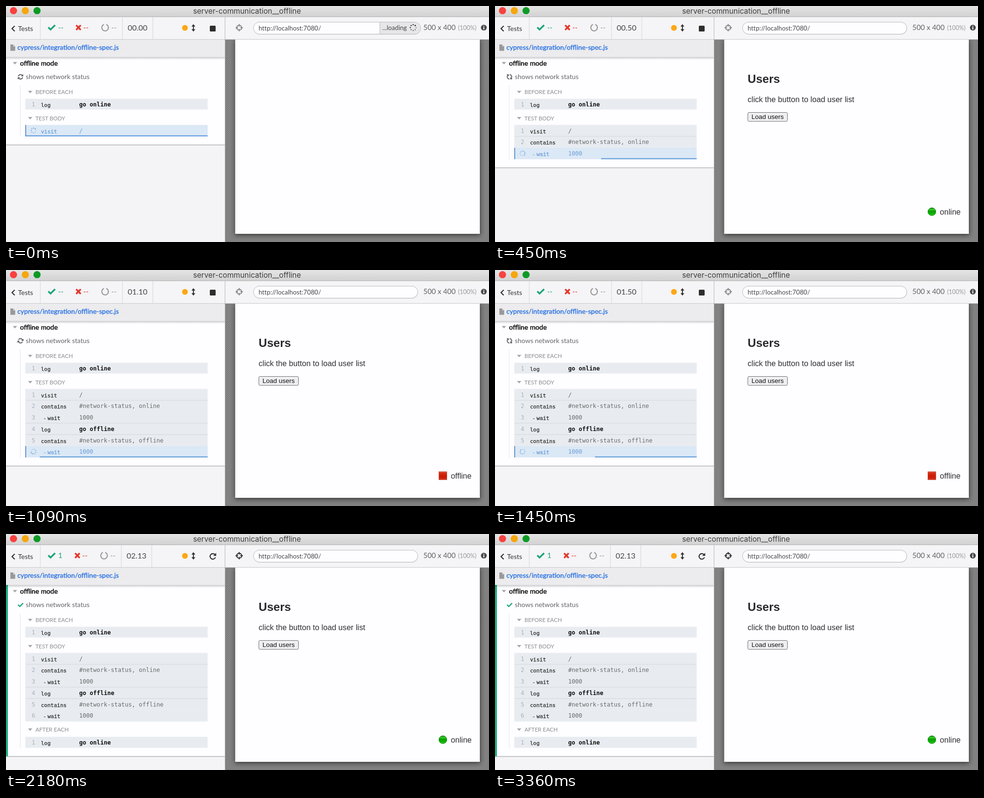
An HTML page that plays this animation: 1000x491 px, repeating every 3450 ms.

```html
<!DOCTYPE html>
<html lang="en">
<head>
<meta charset="utf-8">
<title>Test runner</title>
<style>
  html, body { margin: 0; width: 100%; height: 100%; overflow: hidden; background: #f4f3f5; }
  svg { display: block; width: 100%; height: 100%; }
  text { white-space: pre; }
  .ui { font-family: Lato, "Open Sans", sans-serif; }
  .title { font-family: Inter, "Liberation Sans", sans-serif; }
  .mono { font-family: "DejaVu Sans Mono", "Liberation Mono", monospace; }
  .page { font-family: "Liberation Sans", Arial, sans-serif; }
</style>
</head>
<body>
<svg viewBox="0 0 1000 491" xmlns="http://www.w3.org/2000/svg">
  <defs>
    <linearGradient id="bar" x2="0" y2="1"><stop stop-color="#e6e5e6"/><stop offset="1" stop-color="#d2d1d2"/></linearGradient>
    <linearGradient id="fade" x2="0" y2="1"><stop stop-color="#000" stop-opacity=".2"/><stop offset="1" stop-color="#000" stop-opacity="0"/></linearGradient>
    <linearGradient id="green" x2="0" y2="1"><stop stop-color="#0b7d05"/><stop offset=".22" stop-color="#3fce35"/><stop offset=".4" stop-color="#0aa004"/><stop offset=".7" stop-color="#08b002"/><stop offset="1" stop-color="#2fd022"/></linearGradient>
    <linearGradient id="red" x2="0" y2="1"><stop stop-color="#e2573f"/><stop offset=".25" stop-color="#d3240c"/><stop offset=".7" stop-color="#c91a05"/><stop offset="1" stop-color="#dc3a1e"/></linearGradient>
    <pattern id="stripes" width="4" height="4" patternUnits="userSpaceOnUse">
      <rect width="4" height="4" fill="#777"/>
      <path d="M-1 1L1 -1M0 4L4 0M3 5L5 3" stroke="#919191" stroke-width="1.2"/>
    </pattern>
    <filter id="soft" x="-10%" y="-10%" width="120%" height="120%"><feGaussianBlur stdDeviation="5"/></filter>
    <clipPath id="right"><rect x="454" y="70" width="546" height="421"/></clipPath>
  </defs>
  <g id="scene"></g>
</svg>
<script>
const LOOP = 3450, FPS = 11;
const scene = document.getElementById('scene');
const GREEN = '#1aa67c', RED = '#e5382d', DARK = '#333', BLUE = '#6d9fd6';

const commands = [
  ['visit', '/'],
  ['contains', '#network-status, online'],
  ['wait', '1000'],
  ['log', 'go offline'],
  ['contains', '#network-status, offline'],
  ['wait', '1000']
];
const shown = [1, 3, 6, 6];
const waitStart = [0, -20, 1014];

const text = (cls, x, y, size, str, fill, more = '') =>
  `<text class="${cls}" x="${x}" y="${y}" font-size="${size}" fill="${fill}" ${more}>${str}</text>`;
const rect = (x, y, w, h, fill, more = '') =>
  `<rect x="${x}" y="${y}" width="${w}" height="${h}" fill="${fill}" ${more}/>`;
const disc = (x, y, r, fill, more = '') =>
  `<circle cx="${x}" cy="${y}" r="${r}" fill="${fill}" ${more}/>`;
const line = (d, color, width = 1, more = '') =>
  `<path d="${d}" fill="none" stroke="${color}" stroke-width="${width}" ${more}/>`;
const fill = (d, color) => `<path d="${d}" fill="${color}"/>`;
const heavy = (color, width) => `stroke="${color}" stroke-width="${width}"`;
const caret = (x, y) => fill(`M${x - 4.5} ${y - 2.5}h9l-4.5 5z`, '#a5a5a8');

function spinner(x, y, r, color, angle) {
  let dots = '';
  for (let i = 0; i < 8; i++) {
    const a = (angle + i * 45) * Math.PI / 180;
    dots += disc(x + r * Math.cos(a), y + r * Math.sin(a), r * (.14 + .014 * i), color);
  }
  return dots;
}

function refresh(x, y, angle) {
  const half = turn => `<g transform="rotate(${turn})">` +
    line('M-4.6 -1A4.7 4.7 0 0 1 3.3 -3.3', '#555', 1.8) + fill('M5.6 -5.6v4.6h-4.6z', '#555') + '</g>';
  return `<g transform="translate(${x} ${y}) rotate(${angle})">${half(0)}${half(180)}</g>`;
}

function titleBar() {
  return rect(0, 0, 1000, 23, 'url(#bar)') + rect(0, 22, 1000, 1, '#b4b3b4') +
    disc(15.5, 9.7, 7.4, '#f8423f') + disc(40, 9.7, 7.4, '#f5a70d') + disc(64.3, 9.7, 7.4, '#0b9a24') +
    text('title', 499, 15.8, 15.35, 'server-communication__offline', '#3c3c3c', 'text-anchor="middle"');
}

function toolbar(t, phase) {
  const done = phase === 3, dx = done ? -2.2 : 0;
  const clock = done ? '02.13' : '0' + (Math.floor((t + 60) / 100) / 10).toFixed(2);
  let s = rect(0, 23, 1000, 47, '#f5f4f6') + rect(0, 69, 1000, 1, '#c9c8ca');
  for (const x of [71, 241 + dx, 304 + dx]) s += rect(x - .5, 23, 1, 46, '#d5d4d6');
  s += line('M18 41.5L12.5 47L18 52.5', DARK, 2.2) + text('ui', 25, 52, 14, 'Tests', DARK);
  s += line('M87.5 44.5L92.3 49L101.7 39.8', GREEN, 3.6) +
    text('ui', 108, 50, 15, done ? '1' : '--', GREEN);
  s += `<g transform="translate(${dx} 0)">` +
    line('M145.3 40L154.7 49.8M154.7 40L145.3 49.8', RED, 3.6) + text('ui', 160, 50, 15, '--', RED) +
    line('M207.6 38.6A6.8 6.8 0 1 1 202.8 38.6', '#999', 2.1) + text('ui', 218, 50, 15, '--', '#999') +
    text('ui', 252, 51, 16, clock, '#444') + '</g>';
  s += disc(370.5, 45.5, 6, '#fba815') + line('M388 41V50', DARK, 2) +
    fill('M388 37.8l4 5h-8zM388 53.2l4-5h-8z', DARK);
  s += done
    ? line('M432.8 43.2A5.7 5.7 0 1 0 433.6 48.5', DARK, 2.2) + fill('M435.2 39.3v6.2h-6.2z', DARK)
    : rect(422, 41, 12, 12, '#2e2e2e', 'rx="1.5"');
  return s;
}

function addressBar(t, phase) {
  const ink = phase === 3 ? '#2c2c2c' : '#888', width = phase ? 340 : 346;
  let s = disc(482.8, 45.2, 5.2, 'none', heavy(ink, 1.9)) +
    line('M482.8 37.6v5.2M482.8 47.6v5.2M475.2 45.2h5.2M485.2 45.2h5.2', ink, 1.9);
  s += rect(513, 34.5, width, 25, '#dedde0', 'rx="12.5"') +
    rect(512.5, 33.5, width, 25, '#fefdff', 'rx="12.5" stroke="#b9b8bb"');
  if (!phase) s += fill('M774 34H846a12 12 0 0 1 0 24H774z', '#e6e5e8') + rect(773.5, 34, 1, 24, '#b9b8bb') +
    text('ui', 779, 50, 13.1, '...loading', '#444') + spinner(843, 45, 6, DARK, t * .18);
  return s + text('ui', 523, 51, 13, 'http://localhost:7080/', '#444', 'letter-spacing=".15"') +
    text('ui', 864, 50, 14.9, '500 x 400', '#666') + text('ui', 936, 50, 12.4, '(100%)', '#999') +
    disc(989.3, 45, 6.1, '#4a4a4a') + rect(988.3, 44, 2, 4.8, '#f5f4f6') + rect(988.3, 41.2, 2, 1.8, '#f5f4f6');
}

function row(y, num, [name, value], live) {
  const ink = live ? BLUE : DARK, h = 23.75;
  const bold = name === 'log', child = name === 'wait';
  let s = rect(40, y, 377.5, h, live ? '#dbe8f6' : '#e8ecf0');
  if (live) s += rect(40, y, 1.5, h, '#3f78c0') + spinner(57, y + 11.6, 5, BLUE, live.angle);
  else s += text('mono', 53.2, y + 16.2, 12, num, '#a9b2bc');
  if (child) s += text('mono', 77, y + 17, 11, '-', ink, heavy(ink, .3));
  s += text('mono', child ? 86 : 72.5, y + 17, 11, name, ink, heavy(ink, .3));
  s += text('mono', 151.5, y + 16.2, 12.08, value, live ? BLUE : bold ? '#111' : '#6a6a6c', bold ? 'font-weight="700"' : '');
  if (live && live.left < 1) {
    const x = 41 + 376.5 * live.left;
    s += rect(x, y + h - 2.2, 417.5 - x, 2.2, '#66a0db');
  }
  return s;
}

const heading = (y, str) => caret(50, y - 4) + text('ui', 61, y, 11.55, str, '#8c8c8f');

function report(t, phase) {
  const done = phase === 3, count = shown[phase], step = 23.75, top = 247.5;
  const rowsEnd = done ? 445 : top + count * step, end = rowsEnd + 17.5;
  const angle = t * .18;
  let s = rect(0, 70, 453, 421, '#f4f3f5') + rect(0, 106, 453, end - 106, '#fefdff') +
    rect(0, end - .5, 453, 1.6, '#b9b8bb');
  if (done) s += rect(0, 106, 4, end - 106, '#17b184');
  s += rect(0, 70, 453, 36, '#ecebed') + rect(0, 106, 453, 6, 'url(#fade)') +
    fill('M9 80h6l4 4v9.3H9z', '#9a9a9d') + fill('M15 80v4h4z', '#d4d4d6') +
    text('ui', 23.5, 91.3, 14, 'cypress/integration/offline-spec.js', '#2b74e4', heavy('#2b74e4', .4));
  s += caret(18.5, 119) + text('ui', 29, 124, 14.2, 'offline mode', '#111', heavy('#111', .5));
  s += done ? line('M25 147.2L28.6 150.8L35.4 143.8', GREEN, 2.4) : refresh(30, 147.3, angle);
  s += text('ui', 41, 152, 13.8, 'shows network status', '#666');
  s += line(`M29.5 166V${rowsEnd}`, '#c4c4c8', 1, 'stroke-dasharray="1 1.4"');
  s += heading(183, 'BEFORE EACH') + row(193, 1, ['log', 'go online']) + rect(40, 215.3, 378, 2, '#fefdff');
  s += heading(237.5, 'TEST BODY');
  for (let i = 0; i < count; i++) {
    const left = phase ? (t - waitStart[phase]) / 1000 : 0;
    const live = !done && i === count - 1 && { angle, left };
    s += row(top + i * step, i + 1, commands[i], live);
    if (i && commands[i][0] !== 'wait') s += rect(40, top + i * step - .6, 377.5, 1, '#d3d8dd');
  }
  if (done) s += heading(411, 'AFTER EACH') + row(422, 1, ['log', 'go online']) + rect(40, 444.8, 378, 2, '#fefdff');
  return s + rect(453, 23, 1, 468, '#b5b4b7');
}

function preview(phase) {
  let s = '<g clip-path="url(#right)">' + rect(454, 70, 546, 421, 'url(#stripes)') +
    rect(474, 70, 508, 407, '#222', 'filter="url(#soft)" opacity=".75"') + '</g>' +
    rect(474.5, 70, 506.5, 404, '#fefdff');
  if (!phase) return s;
  const offline = phase === 2;
  s += text('page', 523, 160, 24.1, 'Users', '#2a2a2c', 'font-weight="700"') +
    text('page', 523, 200, 16.15, 'click the button to load user list', '#2e2e30') +
    rect(523.5, 221.5, 82, 18.5, '#efeef0', 'rx="2.5" stroke="#6f6f72"') +
    text('page', 531, 235.4, 13.5, 'Load users', '#111');
  s += offline
    ? rect(896.3, 419.8, 16.4, 16.4, 'url(#red)', 'stroke="#b5220f" stroke-width=".8"')
    : disc(904.5, 428, 8.2, 'url(#green)', 'stroke="#0b7d05" stroke-width=".9"');
  return s + text('page', 921, 434, 16.15, offline ? 'offline' : 'online', '#2e2e30');
}

function draw(step) {
  const t = step * 1000 / FPS;
  const phase = step < 1 ? 0 : step < 12 ? 1 : step < 23 ? 2 : 3;
  scene.innerHTML = preview(phase) + report(t, phase) + toolbar(t, phase) +
    rect(453, 23, 1, 468, '#b5b4b7') + addressBar(t, phase) + titleBar();
}

let last = -1;
const origin = performance.now();
function tick() {
  // Steps start at multiples of 1/11 s, rounded to 10 ms.
  const ticks = Math.floor(((performance.now() - origin) % LOOP) / 10);
  const step = Math.ceil((ticks + .5) * FPS / 100) - 1;
  if (step !== last) draw(last = step);
  requestAnimationFrame(tick);
}
tick();
</script>
</body>
</html>
```
